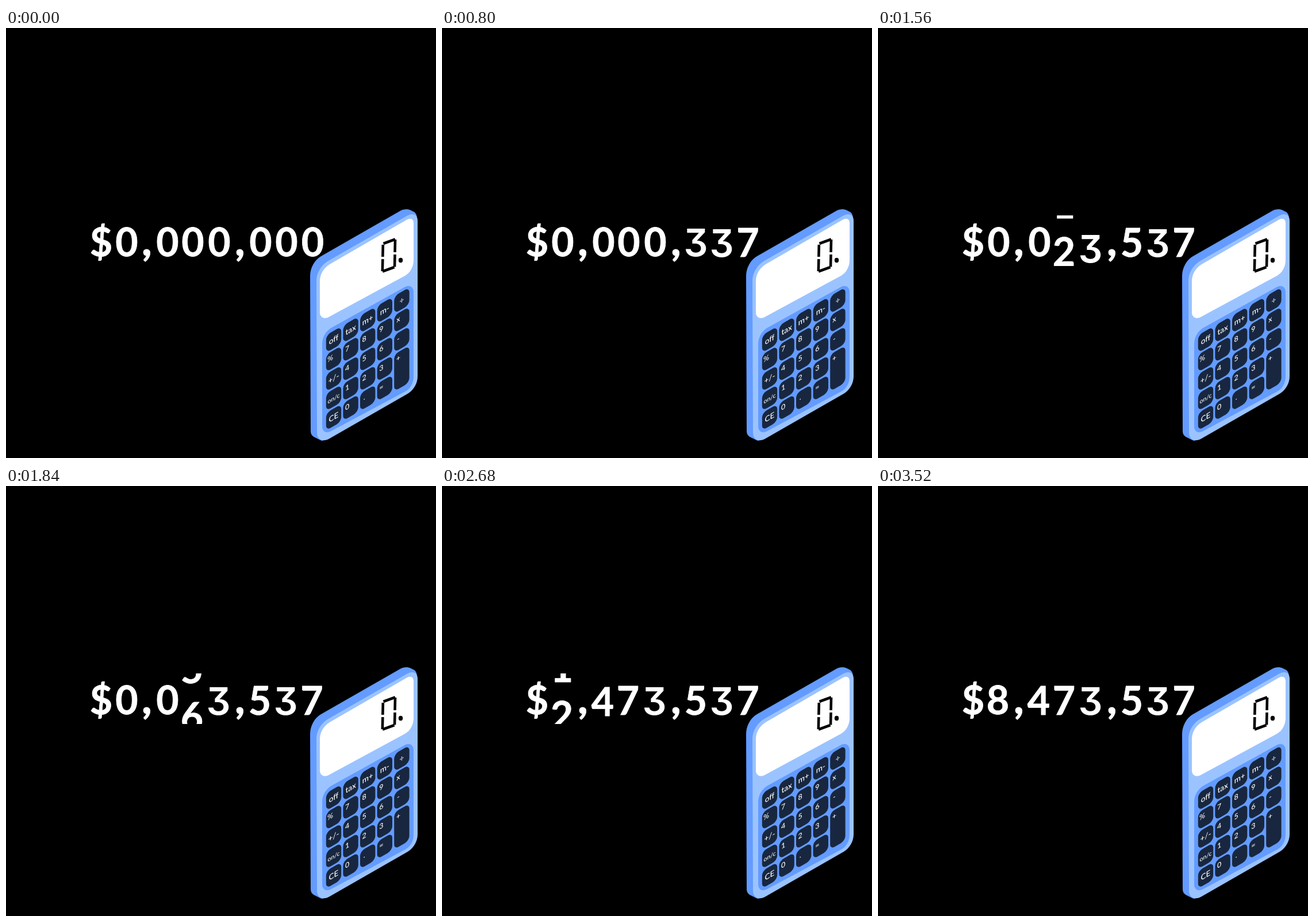
Recreate the animation shown at these times as an HTML page. Size 748 px wide and 748 px high, loop 3840 ms.

```html
<!DOCTYPE html>
<html lang="en">
<head>
<meta charset="utf-8">
<title>Counter</title>
<style>
html, body { margin: 0; width: 100%; height: 100%; overflow: hidden; background: #000; }
svg { display: block; width: 100vw; height: 100vh; }
text { fill: #fff; text-anchor: middle; font-family: Lato, sans-serif; }
#amount text { font-size: 68px; font-weight: 700; stroke: #fff; stroke-width: .8px; }
#amount .comma { font-weight: 900; }
#amount .flat { font: 600 66px Inter, sans-serif; font-feature-settings: "cv09"; stroke: none; }
#keys text { font-weight: 500; }
</style>
</head>
<body>
<svg viewBox="0 0 748 748">
  <clipPath id="window"><rect x="140" y="326" width="420" height="88"/></clipPath>
  <rect width="748" height="748"/>
  <g id="amount">
    <text x="165.5" y="396.5">$</text>
    <text class="comma" x="245" y="395.5">,</text>
    <text class="comma" x="407" y="395.5">,</text>
    <g id="reels" clip-path="url(#window)"></g>
  </g>
  <g id="calculator">
    <path fill="#639bff" d="M529 432C529 418 536 404 548 397L686 318C692 314.500 699 314.500 704 317L710 320C713 322 715 326 715 332V600L556 712L551 718C549 718 547 717 545 716L535 711C531 708 530 705 530 700Z"/>
    <path fill="#9bc3ff" d="M540 440C540 426 548 413 559 406L697 327C707 321 716 324 716 335V606C716 618 709 630 699 636L563 714C551 721 541 716 541 704Z"/>
    <path fill="#fff" d="M546 440C546 428 553 417 563 411L698 333C705 329.500 709 333 709 340V404C709 415 703 426 694 431L561 503C553 507 546 503 546 495Z"/>
    <path fill="none" stroke="#000" stroke-width="4.6" d="M656.500 375L677 367.500M655.800 377L655.300 398M655.300 402L654.800 423M677 368L676.500 390M676.500 394L676 415.500M655 423.500L675.500 416"/>
    <ellipse cx="686.500" cy="404" rx="3.700" ry="4.200"/>
    <path fill="#639bff" d="M550 550C550 538 556 528 565 522L693 451C702 446 709 450 709 460V606C709 617 704 627 695 632L565 701.500C557 705.500 550 702 550 693Z"/>
    <g id="keys"></g>
  </g>
</svg>
<script>
const LOOP = 3840, STEP = 40, BASE = 396.5, PITCH = 83;

// digit, centre x, start ms, duration ms, resting offset
const columns = [
  [8, 210, 2612, 908, 0],
  [4, 281, 2147, 640, 1.5],
  [7, 325, 1480, 850, 1.5],
  [3, 371, 1034, 800, 1.5],
  [5, 443, 650, 570, 1.5],
  [3, 488, 300, 500, 1.5],
  [7, 533.5, 0, 580, 1.5]
];

const labels = [
  ["off", "tax", "m+", "m-", "÷"],
  ["%", "7", "8", "9", "x"],
  ["+/-", "4", "5", "6", "-"],
  ["on/c", "1", "2", "3", "+"],
  ["CE", "0", ".", "="]
];

function add(parent, tag, attrs, text) {
  const el = document.createElementNS("http://www.w3.org/2000/svg", tag);
  for (const name in attrs) el.setAttribute(name, attrs[name]);
  if (text) el.textContent = text;
  parent.appendChild(el);
  return el;
}

function drawKey(label, row, col) {
  const x = 570 + col * 29.6, y = 542 + row * 33.8 - col * 17;
  const tall = label === "+";
  const corner = row && label.length === 1;
  const size = label === "on/c" ? 10.5 : corner ? 12.5 : 13.5;
  const key = add(document.getElementById("keys"), "g",
    { transform: `matrix(1 -.575 0 1 ${x} ${y})` });
  add(key, "rect", { x: -13.2, y: -15.2, width: 26.4, height: tall ? 64.2 : 30.4, rx: 8, fill: "#18273f" });
  add(key, "text", { x: corner ? -6 : 0, y: corner ? -0.2 : 4.5, "font-size": size }, label);
}

labels.forEach((line, row) => line.forEach((label, col) => drawKey(label, row, col)));

const reels = columns.map(([digit, x]) => {
  const reel = add(document.getElementById("reels"), "g", {});
  for (let d = 0; d <= digit; d++) {
    add(reel, "text", {
      x: d ? x - 1.5 : x,
      y: BASE + d * PITCH,
      class: d === 3 ? "flat" : "digit"
    }, String(d));
  }
  return reel;
});

function easeOut(p) {
  return 1 - Math.pow(1 - Math.min(1, Math.max(0, p)), 3);
}

function render(time) {
  const t = Math.floor((time % LOOP) / STEP) * STEP;
  columns.forEach(([digit, , start, duration, rest], i) => {
    const y = easeOut((t - start) / duration) * (rest - digit * PITCH);
    reels[i].setAttribute("transform", `translate(0 ${y.toFixed(2)})`);
  });
}

const begin = performance.now();
function tick() {
  render(performance.now() - begin);
  requestAnimationFrame(tick);
}
render(0);
requestAnimationFrame(tick);
</script>
</body>
</html>
```
